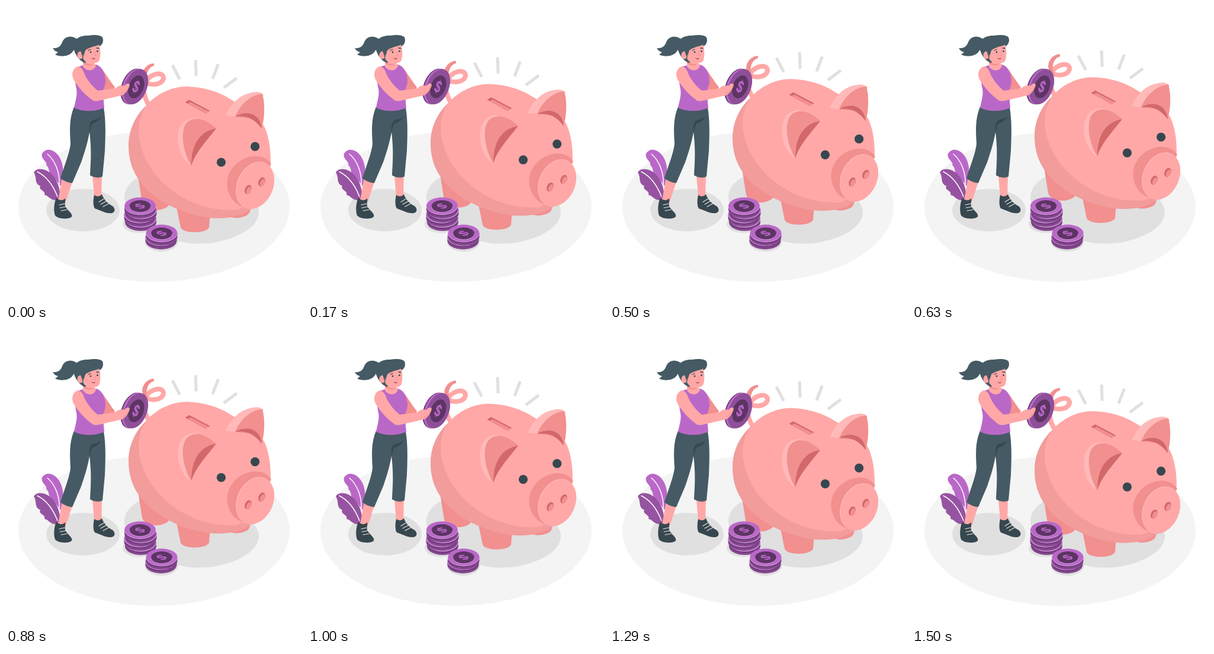
An HTML page for the animation above (1540 ms loop, 500x500 px).

```html
<!DOCTYPE html>
<html lang="en">
<head>
<meta charset="utf-8">
<title>Piggy bank</title>
<style>
html, body { margin: 0; width: 100%; height: 100%; overflow: hidden; background: #fff; }
svg { display: block; width: 100vw; height: 100vh; }
text { font: bold 20px Inter, Arial, sans-serif; text-anchor: middle; fill: #ba68c8; }
.line { fill: none; stroke-linecap: round; stroke-linejoin: round; }
.skin { fill: #ffa8a7; }
.blush { fill: #f28f8f; }
.pale { fill: #ffb9b8; }
.deep { fill: #d2686a; }
.slate { fill: #455a64; }
.ink { fill: #37474f; }
.purple { fill: #ba68c8; }
.plum { fill: #5d3464; }
.gray { fill: #e0e0e0; }
</style>
</head>
<body>
<svg viewBox="0 0 500 500">
  <defs>
    <g id="coin">
      <path d="M-26.5 0V6A26.5 14.7 0 0 0 26.5 6V0Z" fill="#864890"/>
      <path class="line" d="M-25.5 5A26 14.3 0 0 0 25.5 5" stroke="#6b3a74" stroke-width="1.6"/>
      <ellipse class="purple" rx="26.5" ry="14.7"/>
      <path class="line" d="M-26.3 1.5A26.5 14.7 0 0 0 26.3 1.5" stroke="#dcb0e3" stroke-width=".8"/>
    </g>
    <g id="topCoin">
      <use href="#coin"/>
      <ellipse class="plum" rx="18" ry="10"/>
      <path class="line" d="M-18 1A18 10 0 0 0 18 1" stroke="#d39bdc" stroke-width=".7"/>
      <text transform="matrix(.8 -.42 .8 .42 0 0)" y="7">$</text>
    </g>
  </defs>

  <ellipse cx="250" cy="339" rx="229" ry="127" fill="#f4f4f4"/>
  <ellipse class="gray" cx="130" cy="344.7" rx="62" ry="36"/>
  <path class="gray" d="M228 287C208 297 200 310 200 324C201 345 230 368 258 383C285 400 315 404 350 400C390 393 425 375 427 350C428 335 415 322 400 315Z"/>

  <g id="pig">
    <path class="line" d="M281 100L293.500 124M320.200 91L321.200 118.500M358.500 98L349 123M390 121.500L368 138" stroke="#e0e0e0" stroke-width="5" style="stroke-linecap:butt"/>
    <path class="line" d="M243 170C228 148 230 128 245 118.500C258 111 267 115 266 122.500C263 134 242 135 236 128" stroke="#ffa8a7" stroke-width="8"/>
    <path class="blush" d="M250 97C240 97 231 105 230 117L232 130L241 134C234 118 239 104 250 101Z"/>

    <path class="blush" d="M221 275L230 332C234 346 262 349 274 338C278 334 278 328 281 315L250 270Z"/>
    <path class="blush" d="M287 335L295 374C299 385 338 385 343 374L346 340Z"/>
    <path class="blush" d="M373 350C377 360 394 360 406 354C412 351 413 346 413 335Z"/>
    <path d="M238 167C218 185 207 210 207 236C207 262 215 280 224 293C240 320 290 352 345 358C380 361 405 352 418 340L430 250L300 160Z" fill="#f29c9b"/>
    <path class="skin" d="M238 167C226 183 221 205 226 228C232 262 255 295 290 318C320 338 355 347 392 344C430 325 447 297 447 260C447 235 442 215 436 203C425 185 400 170 380 158C360 145 335 137 306 136C280 136 255 148 238 167Z"/>

    <path class="deep" d="M302.500 162.500L309.500 158.500L344.500 177L337 181.500Z"/>
    <path class="blush" d="M307 164.800L311.500 162.200L342.500 178.300L337 181.500Z"/>

    <path class="pale" d="M313 270C297 261 288 237 291 215C294 198 304 189 320 188.500L335 194L318 225Z"/>
    <path class="blush" d="M313 270C299 247 294 214 304 199C316 184 338 190 355 207C336 215 319 239 313 270Z"/>
    <path class="deep" d="M355 207C334 210 313 226 313 270C319 249 336 231 355 207Z"/>
    <path class="pale" d="M371 185C380 165 394 151 412 147C423 144 432 145 435 151L410 172L388 187Z"/>
    <path class="blush" d="M387 187C396 166 413 150 433 148.500C438 165 437 189 432 207L418 190Z"/>
    <path class="deep" d="M387 187C402 177 429 178 432 207C420 190 404 184 387 187Z"/>

    <circle class="ink" cx="363.500" cy="264" r="7.600"/>
    <circle class="ink" cx="420.700" cy="237.300" r="7.600"/>

    <path class="blush" d="M398 339C380 331 371 311 374 293C378 272 396 256 419 253.500C431 253 442 257 448 267Z"/>
    <g transform="translate(420.700 303) rotate(24)">
      <ellipse class="pale" rx="30.500" ry="41.500"/>
      <ellipse class="skin" cx=".7" cy=".3" rx="29.700" ry="41"/>
    </g>
    <g id="nostril" transform="translate(409 310) rotate(24)">
      <ellipse class="deep" rx="5.300" ry="8"/>
      <ellipse class="blush" cx="1.600" cy="1" rx="3.600" ry="6.600"/>
    </g>
    <use href="#nostril" x="23" y="-13"/>
  </g>

  <ellipse class="gray" cx="225.500" cy="368" rx="28.500" ry="15.500"/>
  <use href="#coin" x="227.500" y="359.300"/>
  <use href="#coin" x="226" y="352"/>
  <use href="#coin" x="228" y="345"/>
  <use href="#topCoin" x="226.500" y="338"/>
  <ellipse class="gray" cx="262.500" cy="398" rx="28" ry="17"/>
  <use href="#coin" x="262" y="390.500"/>
  <use href="#topCoin" x="263" y="384"/>

  <g id="plant">
    <path class="purple" d="M61 249C68 239 80 242 88 252C98 265 99 285 92 304L80 288C70 284 75 274 68 269C71 263 58 259 61 249Z"/>
    <path d="M47 281C51 274 62 274 72 280C83 287 91 302 92 323L84 328C73 327 73 321 65 319C68 312 54 311 58 304C47 299 53 291 47 281Z" fill="#9653a1"/>
    <path class="line" d="M70 250C83 261 91 281 90 301M53 280C69 288 80 304 87 322" stroke="#fff" stroke-width="1.500"/>
  </g>

  <g id="legs">
    <path class="skin" d="M95 290L112 297L101 331L88 328ZM146 287L162 287L161 324L149 322Z"/>
    <path class="slate" d="M115 170C130 178 150 178 165 171C169 195 168 220 167 245L163 288C157 291 148 290 142 286C143 265 145 245 141 213C138 232 131 252 127 264L112 299C105 299 97 295 92 291C99 268 107 250 109 233C108 212 106 192 115 170Z"/>
    <path class="ink" d="M141 214C140 203 142 195 146 193C151 192 157 190 161 187C158 193 152 197 147 198C143 202 143 208 141 214Z"/>
    <path class="ink" d="M85 324C81 333 80 346 83 354C89 360 105 361 111 356C113 350 104 346 100 338C99 332 101 329 100 325C95 330 89 328 85 324Z"/>
    <path class="ink" d="M149 319C147 328 147 338 150 342C160 345 168 351 178 350C185 349 185 342 180 338C172 334 165 327 162 318C158 323 152 322 149 319Z"/>
    <path class="line" d="M90 336L99 334M91 341L101 339M93 346L103 344M157 331L165 326M160 335L169 330M164 339L173 334" stroke="#e6e6e6" stroke-width="1.200"/>
  </g>

  <g id="torso">
    <path class="blush" d="M158 102C167 111 174 125 184 137L180 146L163 146Z"/>
    <path class="purple" d="M121 103L130 100L152 99C161 101 167 112 168 124C169 134 163 139 164 150L166 172C150 179 130 179 115 172C117 160 121 151 119 140C116 128 116 114 121 103Z"/>
    <path class="skin" d="M130 90L130 102C134 109 147 113 152 101L148 94Z"/>
    <path class="blush" d="M131 93C136 98 141 99 147 98C143 102 136 101 131 97Z"/>
  </g>

  <g id="head">
    <path class="slate" d="M122 57C110 48 99 51 95 61C92 69 87 72 79 71C81 75 84 77 88 78C86 80 84 81 83 82C91 86 104 86 111 79C117 73 117 67 118 62Z"/>
    <path class="slate" d="M114 66C114 56 126 49 139 50C149 48 160 49 163 53C166 60 162 67 156 69L134 96C124 94 113 78 114 66Z"/>
    <path class="skin" d="M134 75C138 71 147 69 157 65C160 73 160 84 158 91C156 97 146 98 139 96C134 95 131 91 130 88Z"/>
    <ellipse class="skin" cx="125.500" cy="83" rx="5" ry="6.500"/>
    <path class="line" d="M123 81C126 81 127 84 126 86" stroke="#f28f8f"/>
    <path class="slate" d="M131 91C128 83 132 75 137 70C144 68 155 69 161 62L140 58L124 70Z"/>
    <circle class="ink" cx="143" cy="78" r="1.400"/>
    <circle class="ink" cx="154.500" cy="76.500" r="1.400"/>
    <path class="line" d="M139 75L143 73.500M153 71L157 71.500" stroke="#37474f" stroke-width="1.300"/>
    <path class="line" d="M150 78L152 83L149 84" stroke="#f28f8f"/>
    <path d="M144 87C147 89 149 89 151 87.500C150 91 146 91 144 87Z" fill="#a83f47"/>
  </g>

  <g transform="translate(218.500 136) rotate(21)">
    <ellipse class="plum" cx="-3.500" cy="1.300" rx="19.500" ry="31.500"/>
    <ellipse cx="-1.800" cy=".7" rx="19.500" ry="31.500" fill="#ba68c8"/>
    <ellipse cx="1" rx="18.700" ry="31.200" fill="#8e4f99"/>
    <ellipse class="plum" cx="1.500" rx="12.500" ry="20"/>
    <text transform="scale(.85 1.300)" x="1.500" y="7">$</text>
  </g>
  <path class="skin" d="M121 102C112 106 110 115 114 124C122 138 134 150 146 159C150 162 156 160 161 159L191 152C199 152 207 143 209 133C207 129 203 131 200 135C195 133 188 135 185 139L155 143C146 136 138 126 133 116C130 108 128 103 121 102Z"/>
  <path class="line" d="M208 136C205 142 201 146 196 147" stroke="#f28f8f"/>
</svg>
<script>
const FRAMES = 37, FRAME_MS = 41.6, LOOP = 1540, RISE = 19.5;
const pig = document.getElementById("pig");

// The pig rises and falls at constant speed, held at 24 steps per second.
function lift(ms) {
  const step = Math.min(FRAMES - 1, Math.floor((ms % LOOP + 5) / FRAME_MS));
  const phase = (step + 1) % FRAMES / FRAMES;
  return RISE * (1 - Math.abs(1 - 2 * phase));
}

const restLift = lift(0);

function draw() {
  pig.setAttribute("transform", `translate(0 ${restLift - lift(performance.now())})`);
  requestAnimationFrame(draw);
}
draw();
</script>
</body>
</html>
```
